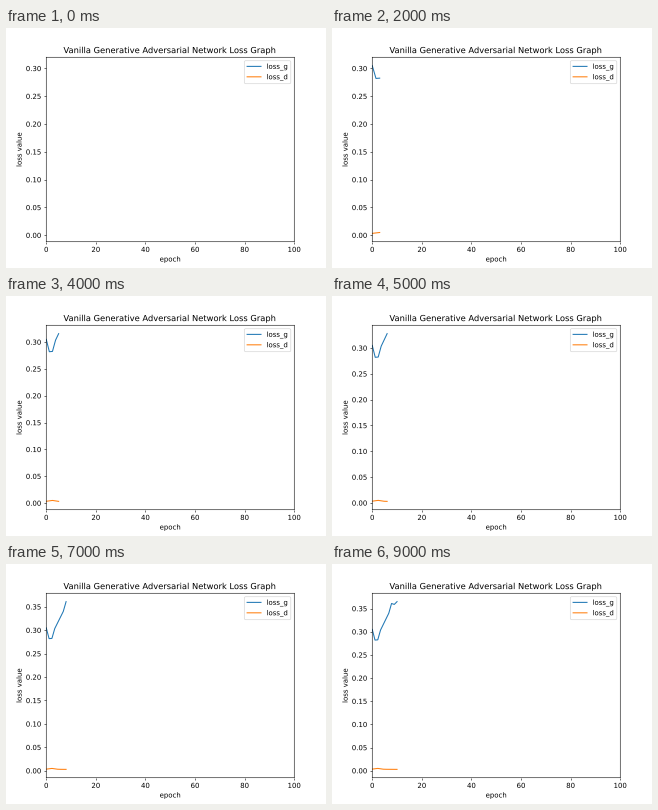
Animation of 320 by 240 pixels, one loop 10 s. Source, as a matplotlib script:

```python
import numpy as np
import matplotlib.pyplot as plt
from matplotlib import patheffects
from matplotlib.animation import FuncAnimation

FRAMES = 10
WIDTH, HEIGHT, DPI = 320, 240, 50

# Outline text and unsnapped lines give soft, evenly weighted edges.
plt.rcParams.update({
    "font.family": "DejaVu Sans",
    "text.hinting": "none",
    "path.snap": False,
    "path.effects": [patheffects.Normal()],
})


def loss_g(k):
    """Sharp dip, steady climb, then a small kink at the top."""
    return np.interp(k, [0, 1, 2, 3, 6, 7, 8, 9],
                     [.305, .282, .2825, .3035, .34, .361, .359, .365])


def loss_d(k):
    """Slow decay with one low bump around the third sample."""
    return 0.0032 - 0.00004 * k + 0.0018 * np.exp(-((k - 2) / 1.3) ** 2)


fig, ax = plt.subplots(figsize=(WIDTH / DPI, HEIGHT / DPI), dpi=DPI)
fig.subplots_adjust(left=40.25 / WIDTH, right=288.25 / WIDTH,
                    top=1 - 29.25 / HEIGHT, bottom=1 - 213.75 / HEIGHT)
line_g, = ax.plot([], [], label="loss_g")
line_d, = ax.plot([], [], label="loss_d")
ax.set(title="Vanilla Generative Adversarial Network Loss Graph",
       xlabel="epoch", ylabel="loss value", xlim=(0, 100))
ax.legend(loc="upper right")


def update(i):
    n = i + 1
    k = np.arange(n)
    # n samples are spread evenly over [0, n], so the spacing shrinks each step
    epochs = np.linspace(0, n, n)
    g, d = loss_g(k), loss_d(k)
    line_g.set_data(epochs, g)
    line_d.set_data(epochs, d)
    pad = 0.05 * (g.max() - d.min())
    ax.set_ylim(d.min() - pad, g.max() + pad)
    return line_g, line_d


anim = FuncAnimation(fig, update, frames=FRAMES, interval=1000,
                     init_func=lambda: update(0), repeat=True, blit=False)
plt.show()
```
